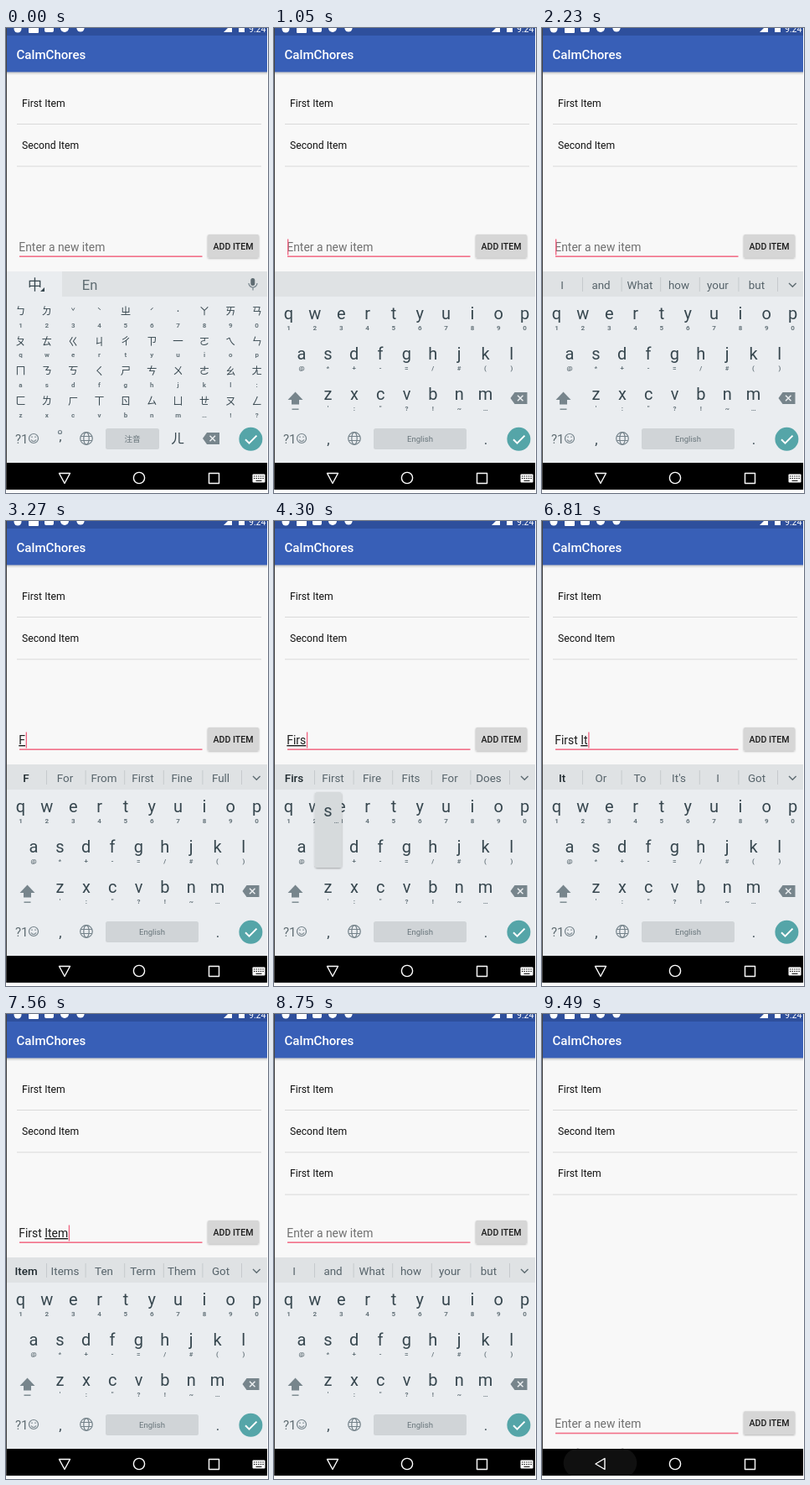
Recreate the animation shown at these times as an HTML page. Size 313 by 554 pixels, loop 9.59 s.

```html
<!DOCTYPE html>
<html lang="en">
<head>
<meta charset="utf-8">
<title>CalmChores</title>
<style>
html, body { margin: 0; width: 100%; height: 100%; overflow: hidden; background: #f8f8f8; }
svg { display: block; width: 100vw; height: 100vh; font-family: Roboto, "Noto Sans CJK TC", "Noto Sans CJK", sans-serif; }
.item { font-size: 12.2px; fill: #111; }
.field { font-size: 13.9px; white-space: pre; }
.key { font-size: 20px; fill: #37474f; text-anchor: middle; }
.zh { font-size: 12.5px; fill: #37474f; text-anchor: middle; font-family: "Noto Sans CJK TC", "Noto Sans CJK", sans-serif; }
.tone { font-size: 9px; }
.sub { font-size: 8px; font-weight: 700; fill: #66747b; text-anchor: middle; }
.word { font-size: 13.4px; fill: #56636a; text-anchor: middle; }
.word.top { font-weight: 500; fill: #1f2a2f; }
.space { font-size: 9.6px; fill: #68757b; text-anchor: middle; }
.line { fill: none; stroke: #74828a; stroke-width: 1.2; }
.nav { fill: none; stroke: #fff; stroke-width: 1.4; stroke-linejoin: round; }
</style>
</head>
<body>
<svg viewBox="0 0 313 554" preserveAspectRatio="none">
  <defs>
    <linearGradient id="fade" x2="0" y2="1">
      <stop stop-color="#000" stop-opacity=".2"/><stop offset="1" stop-color="#000" stop-opacity="0"/>
    </linearGradient>
    <filter id="lift" x="-20%" y="-20%" width="140%" height="150%">
      <feDropShadow dx="0" dy="1" stdDeviation="1" flood-opacity=".32"/>
    </filter>
    <g id="erase">
      <path d="M-10 0L-5-7H10V7H-5Z" fill="#77858c"/>
      <path d="M-1.5-3.2L5 3.2M5-3.2L-1.5 3.2" stroke="#eceff1" stroke-width="1.5"/>
    </g>
  </defs>

  <rect width="313" height="554" fill="#f8f8f8"/>
  <rect width="313" height="9" fill="#2e4f9c"/>
  <rect y="9" width="313" height="43.5" fill="#385fb7"/>
  <rect y="52.5" width="313" height="3.5" fill="url(#fade)"/>
  <g fill="#fff">
    <circle cx="14" cy="1" r="4.5"/><rect x="27" y="-4" width="12" height="10" rx="1"/>
    <rect x="46" y="-5" width="11" height="10" rx="2"/><circle cx="70" cy="0" r="5"/>
    <circle cx="89" cy="0" r="4.6"/>
    <path d="M260 5L270-5V5Z"/><rect x="278" y="-6" width="7" height="11"/>
    <text x="290" y="4.6" font-size="10.6">9:24</text>
    <text x="12.5" y="37" font-size="15.1" font-weight="500">CalmChores</text>
  </g>

  <g id="items"></g>

  <g id="entry">
    <rect x="16" y="271.4" width="218.5" height="1.6" fill="#f27089"/>
    <text id="field" class="field" x="15.3" y="266"></text>
    <rect id="cursor" y="251.5" width="1.3" height="19" fill="#f0627f"/>
    <rect id="add" x="241" y="246" width="61" height="27.5" rx="1.5" filter="url(#lift)"/>
    <text x="271.5" y="263.8" font-size="10.6" font-weight="500" text-anchor="middle" fill="#1c1c1c">ADD ITEM</text>
  </g>

  <g id="board">
    <rect y="290" width="313" height="228" fill="#eaedf0"/>
    <rect y="290" width="313" height="30" fill="#dfe2e4"/>
    <g id="strip"></g>
    <g id="zhuyin">
      <rect y="290" width="67" height="30" fill="#eaedf0"/>
      <text class="zh" x="34.5" y="312" style="font-size:17px">中</text>
      <path d="M46 309V314H41Z" fill="#37474f"/>
      <text x="100" y="311.5" font-size="16.5" text-anchor="middle" fill="#5f6c72">En</text>
      <rect x="292.3" y="298" width="5" height="9" rx="2.5" fill="#5f6c72"/>
      <path class="line" d="M290 304a5 5 0 0 0 10 0M295 309v3.5"/>
      <circle class="line" cx="64.5" cy="481.5" r="2"/>
      <text class="key" x="65" y="492" style="font-size:15px">,</text>
      <text class="zh" x="205" y="495" style="font-size:16px">ㄦ</text>
      <use href="#erase" x="245" y="489"/>
    </g>
    <g id="latin">
      <path id="shift" d="M25.5 433.5L34.5 443H30V448.5H21V443H16.5Z"/>
      <rect x="21.5" y="453.5" width="8" height="1.4" fill="#77858c"/>
      <use href="#erase" x="292.5" y="441"/>
      <text class="key" x="65" y="496" style="font-size:17px">,</text>
      <text class="key" x="253" y="496" style="font-size:17px">.</text>
    </g>
    <text x="11" y="495" font-size="15" fill="#5f6c72">?1</text>
    <g class="line">
      <circle cx="33" cy="489" r="5.5"/><path d="M30 490.5q3 4 6 0M31 486.5v1.6M35 486.5v1.6"/>
      <circle cx="96" cy="489" r="7.3"/><ellipse cx="96" cy="489" rx="3.2" ry="7.3"/>
      <path d="M89.4 486.5h13.2M89.4 491.5h13.2"/>
    </g>
    <rect id="bar" x="119" y="477" height="25" rx="2.5"/>
    <text id="lang" class="space" y="493"></text>
    <circle cx="292.4" cy="489.8" r="14" fill="#55a5a8"/>
    <path d="M286 490.3l4.5 4.3 9-9" fill="none" stroke="#fff" stroke-width="2"/>
    <g id="pop"></g>
  </g>

  <rect y="518" width="313" height="32" fill="#000"/>
  <path id="ripple" d="M45 518H94a17 17 0 0 1 10 32H35a17 17 0 0 1 10-32Z" fill="#101010"/>
  <path id="back" class="nav"/>
  <circle class="nav" cx="159" cy="536" r="6.6"/>
  <rect class="nav" x="242.5" y="530.5" width="12" height="12"/>
  <g id="ime">
    <rect x="294.5" y="531.5" width="15" height="10" rx="1" fill="#fff"/>
    <path d="M296 534h12M296 536.5h12" stroke="#000" stroke-dasharray="1.4 1.2"/>
    <path d="M298.5 539.3h7" stroke="#000"/>
  </g>
  <rect width="1" height="550" fill="#444"/>
  <path d="M312 0h1V554H0V550H312Z" fill="#fff"/>
</svg>

<script>
const $ = id => document.getElementById(id);
const show = (el, on) => { el.style.display = on ? '' : 'none'; };
const text = (cls, x, y, s) => `<text class="${cls}" x="${x}" y="${y}">${s}</text>`;

const STEP = 31.35;
const rows = [
  { keys: 'qwertyuiop', subs: '1234567890', x: 17.5, y: 340 },
  { keys: 'asdfghjkl', subs: '@*+-=/#()', x: 33, y: 388 },
  { keys: 'zxcvbnm', subs: '\':"?!~…', x: 64.5, y: 436 }
];
const zhRows = [
  ['ㄅㄉˇˋㄓˊ˙ㄚㄞㄢ', '1234567890'],
  ['ㄆㄊㄍㄐㄔㄗ一ㄛㄟㄣ', 'qwertyuiop'],
  ['ㄇㄋㄎㄑㄕㄘㄨㄜㄠㄤ', 'asdfghjkl:'],
  ['ㄈㄌㄏㄒㄖㄙㄩㄝㄡㄥ', 'zxcvbnm…!?']
];

function add(parent, html) {
  const g = document.createElementNS('http://www.w3.org/2000/svg', 'g');
  g.innerHTML = html;
  $(parent).append(g);
  return g;
}

const latinKeys = upper => rows.map(r => [...r.keys].map((k, i) => {
  const x = r.x + i * STEP;
  return text('key', x, r.y + 7, upper ? k.toUpperCase() : k) + text('sub', x, r.y + 20, r.subs[i]);
}).join('')).join('');

const small = add('latin', latinKeys(false));
const caps = add('latin', latinKeys(true));
add('zhuyin', zhRows.map(([keys, subs], n) => [...keys].map((k, i) => {
  const x = 17.5 + i * STEP, y = 337 + n * 35.7;
  const tone = 'ˇˋˊ˙'.includes(k);
  return text(tone ? 'zh tone' : 'zh', x, y + (tone ? 3.5 : 5), k) + text('sub', x, y + 19.5, subs[i]);
}).join('')).join(''));

function popup(key) {
  if (!key) return '';
  const low = key.toLowerCase();
  const r = rows.find(r => r.keys.includes(low));
  const x = r.x + r.keys.indexOf(low) * STEP;
  return `<rect x="${x - 15.5}" y="${r.y - 65}" width="32" height="90" rx="3" fill="#d6dadc" filter="url(#lift)"/>` +
    text('key', x, r.y - 36, key) + text('sub', x + 10, r.y - 28, '…');
}

function strip(words, typing) {
  if (!words) return '';
  let out = '<path d="M295 304l4.3 4.3 4.3-4.3" fill="none" stroke="#5f6c72" stroke-width="1.4"/>';
  words.split(' ').forEach((w, i) => {
    out += text(typing && !i ? 'word top' : 'word', 24 + i * 46.5, 310.8, w) +
      `<rect x="${48 + i * 46.6}" y="297" width="1" height="17" fill="#c6cacd"/>`;
  });
  return out;
}

const DEFAULT = 'I and What how your but';
const start = {
  kb: 'zh', words: '', done: '', comp: '', cur: 0, pop: '',
  items: 2, space: 0, press: 0, back: 0, hidden: 0
};
// Each step changes only the listed parts of the state.
const steps = [
  [150, { cur: 1 }],
  [600, { cur: 0, kb: 'small' }],
  [1050, { cur: 1 }],
  [1490, { cur: 0 }],
  [1630, { cur: 1, words: DEFAULT }],
  [1780, { cur: 0 }],
  [2230, { cur: 1 }],
  [2680, { cur: 0, kb: 'caps', words: 'I And What How Your But' }],
  [2970, { pop: 'F' }],
  [3120, { comp: 'F', cur: 1, kb: 'small' }],
  [3270, { pop: '', words: 'F For From First Fine Full' }],
  [3570, { pop: 'i' }],
  [3720, { comp: 'Fi', words: 'Fi Find Fix Fit Do Go' }],
  [3860, { pop: '' }],
  [4010, { pop: 'r' }],
  [4150, { comp: 'Fir', pop: 's', words: 'Fir For First Fire Or Die' }],
  [4300, { comp: 'Firs', words: 'Firs First Fire Fits For Does' }],
  [4450, { pop: 't' }],
  [4600, { comp: 'First', words: 'First Fist Firsts Fire Feast Dirt' }],
  [4740, { pop: '' }],
  [5040, { cur: 0 }],
  [5190, { space: 1 }],
  [5340, { space: 0, comp: '', done: 'First\u00a0', cur: 1, words: 'time and of one thing I' }],
  [5630, { kb: 'caps', words: 'Time And Of One Thing I' }],
  [5780, { cur: 0 }],
  [6070, { pop: 'I' }],
  [6220, { pop: '', comp: 'I', cur: 1, kb: 'small', words: "I It In I'm Is If" }],
  [6510, { pop: 't' }],
  [6660, { comp: 'It', words: "It Or To It's I Got" }],
  [6810, { pop: '' }],
  [6960, { pop: 'e' }],
  [7110, { pop: '', comp: 'Ite', words: 'Ite Item Its Items Ire Ute' }],
  [7410, { pop: 'm' }],
  [7560, { pop: '', comp: 'Item', words: 'Item Items Ten Term Them Got' }],
  [8010, { cur: 0 }],
  [8160, { press: 1 }],
  [8310, { items: 3, done: '', comp: '', cur: 1, words: '' }],
  [8450, { press: 0 }],
  [8600, { words: DEFAULT }],
  [8750, { cur: 0 }],
  [9200, { cur: 1 }],
  [9350, { back: 1 }],
  [9490, { cur: 0, hidden: 1 }]
];
const LOOP = 9590;
const names = ['First Item', 'Second Item', 'First Item'];

function draw(s) {
  const zh = s.kb === 'zh';
  $('items').innerHTML = names.slice(0, s.items).map((n, i) =>
    text('item', 19, 94.2 + i * 50.1, n) +
    `<rect x="13" y="${114 + i * 50.3}" width="292" height="1" fill="#d9d9d9"/>`).join('');

  const field = $('field');
  const typed = s.done || s.comp;
  field.setAttribute('fill', typed ? '#1c1c1c' : '#707070');
  field.innerHTML = typed
    ? `${s.done}<tspan text-decoration="underline">${s.comp}</tspan>` : 'Enter a new item';
  $('cursor').setAttribute('x', 16 + (typed ? field.getComputedTextLength() : 0));
  show($('cursor'), s.cur);
  $('entry').setAttribute('transform', `translate(0 ${s.hidden ? 227.3 : 0})`);
  $('add').setAttribute('fill', s.press ? '#bcbcbc' : '#d6d6d6');

  show($('board'), !s.hidden);
  show($('ime'), !s.hidden);
  show($('zhuyin'), zh);
  show($('latin'), !zh);
  show(small, s.kb === 'small');
  show(caps, s.kb === 'caps');
  $('shift').setAttribute('fill', s.kb === 'caps' ? '#55a5a8' : '#77858c');
  $('strip').innerHTML = strip(s.words, s.comp);
  $('pop').innerHTML = popup(s.pop);
  $('bar').setAttribute('width', zh ? 64 : 111);
  $('bar').setAttribute('fill', s.space ? '#b9bfc3' : '#d0d4d7');
  $('lang').textContent = zh ? '注音' : 'English';
  $('lang').setAttribute('x', zh ? 151 : 174.5);

  show($('ripple'), s.back);
  $('back').setAttribute('d', s.hidden ? 'M64 536L75 529.5V542.5Z' : 'M63.5 530.5H76.5L70 542.5Z');
}

const origin = performance.now();
let last = 0;
function frame(now) {
  const t = Math.max(0, now - origin) % LOOP;
  const n = steps.filter(([at]) => at <= t).length;
  if (n !== last) {
    last = n;
    draw(Object.assign({}, start, ...steps.slice(0, n).map(step => step[1])));
  }
  requestAnimationFrame(frame);
}
draw(start);
requestAnimationFrame(frame);
</script>
</body>
</html>
```
